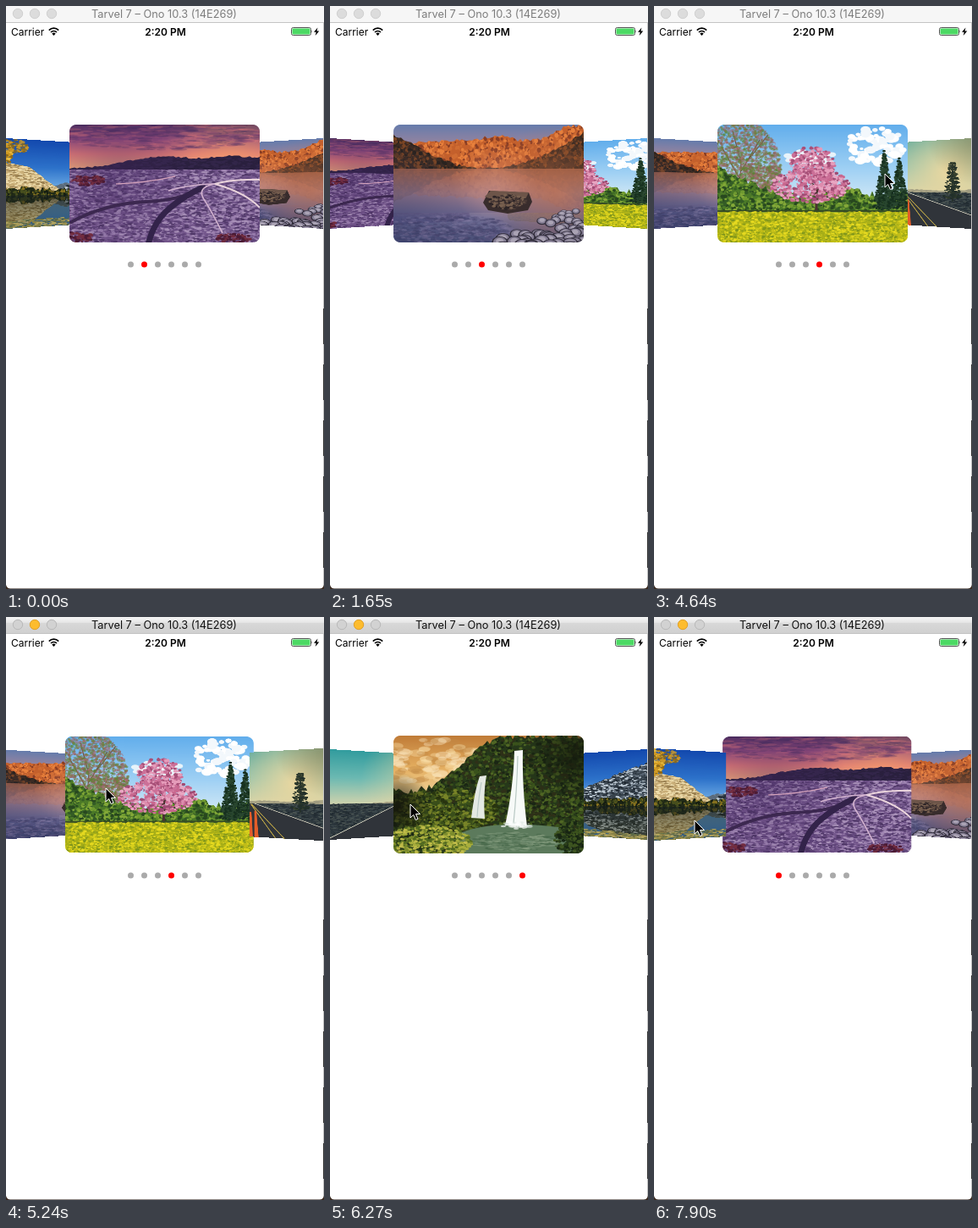
An HTML page with a canvas for the animation above (8 s loop, 376 px wide and 688 px high).

```html
<!DOCTYPE html>
<html lang="en">
<head>
<meta charset="utf-8">
<title>Carousel</title>
<style>
html, body { margin: 0; width: 100%; height: 100%; overflow: hidden; background: #fff; }
canvas, svg { position: absolute; left: 0; top: 0; }
text { font-family: Inter, Roboto, sans-serif; }
#bar { fill: #f6f6f6; }
#title { font-size: 12.8px; fill: #7d7d7d; }
.light { fill: #dcdcdc; stroke: #d0d0d0; }
.active #bar { fill: url(#metal); }
.active #title { fill: #111; }
.active .light { fill: #d2d2d2; stroke: #b9b9b9; }
.active #mid { fill: #fdbc2e; stroke: #e0a028; }
.dot { fill: #aaa; }
.dot.on { fill: #f00; }
</style>
</head>
<body>
<canvas id="stage" width="376" height="688"></canvas>
<svg id="ui" width="376" height="688">
  <defs>
    <linearGradient id="metal" x2="0" y2="1">
      <stop offset=".1" stop-color="#f2f2f2"/><stop offset=".34" stop-color="#e4e4e4"/>
      <stop offset=".36" stop-color="#d8d8d8"/><stop offset="1" stop-color="#cfcfcf"/>
    </linearGradient>
  </defs>
  <rect id="bar" width="376" height="20"/>
  <path d="M0 19.5H376" stroke="#c4c4c4"/>
  <circle class="light" cx="14" cy="9" r="5.7"/>
  <circle class="light" id="mid" cx="34" cy="9" r="5.7"/>
  <circle class="light" cx="54" cy="9" r="5.7"/>
  <text id="title" x="187" y="14" text-anchor="middle">Tarvel 7 – Ono 10.3 (14E269)</text>

  <text x="6" y="34.5" font-size="12">Carrier</text>
  <path d="M50.8 28.6a8 8 0 0 1 11.4 0M53 31a5 5 0 0 1 7 0" fill="none" stroke="#000" stroke-width="1.7"/>
  <path d="M56.5 35l-2.2-2.4a3.2 3.2 0 0 1 4.4 0z"/>
  <text x="188.5" y="34.5" font-size="12" font-weight="600" text-anchor="middle">2:20 PM</text>
  <rect x="337.5" y="25.5" width="23" height="9" rx="2" fill="none" stroke="#555"/>
  <rect x="338.5" y="26.5" width="21" height="7" rx="1" fill="#4cd964"/>
  <path d="M361.5 28.5q1.5 1.5 0 3z" fill="#555"/>
  <path d="M368.5 25.5l-4.5 5.3h2.7l-1 4.2 4.6-5.5h-2.8z"/>

  <path d="M375.5 20V688" stroke="#c4c4c4"/>
  <path d="M375.5 357V688" stroke="#333" stroke-dasharray="42 24"/>
  <path d="M0 687.5H376" stroke="#8d8682"/>
  <path d="M0 683v5h5q-4-1-5-5zM376 683v5h-5q4-1 5-5z" fill="#3a2a20"/>
  <g id="dots"></g>
  <path id="cursor" d="M0 0V16l3.7-3.5 2.6 6 2.8-1.2-2.6-5.8h5z" stroke="#fff"/>
</svg>
<script>
const W = 225, H = 139, COUNT = 6, LOOP = 8000;
const ui = document.getElementById('ui');
const dotBox = document.getElementById('dots');
const cursor = document.getElementById('cursor');
const stage = document.getElementById('stage').getContext('2d');

for (let i = 0; i < COUNT; i++)
  dotBox.innerHTML += `<circle class="dot" cx="${147.5 + 16 * i}" cy="305" r="3.5"/>`;

// ---- Landscape painting ----
let g, seed;
const rnd = () => (seed = (seed * 16807) % 2147483647) / 2147483647;

function ramp(y0, y1, ...colors) {
  const f = g.createLinearGradient(0, y0, 0, y1);
  colors.forEach((c, i) => f.addColorStop(i / (colors.length - 1), c));
  g.fillStyle = f;
  g.fillRect(0, y0, W, y1 - y0);
}
function glow(x, y, r, color) {
  const f = g.createRadialGradient(x, y, 0, x, y, r);
  f.addColorStop(0, color);
  f.addColorStop(1, color.slice(0, 7) + '00');
  g.fillStyle = f;
  g.fillRect(0, 0, W, H);
}
function shape(fill, d) {
  g.fillStyle = fill;
  g.fill(new Path2D(d));
}
function line(color, width, d) {
  g.strokeStyle = color;
  g.lineWidth = width;
  g.stroke(new Path2D(d));
}
// Fills an ellipse with random flecks.
function blob(cx, cy, rx, ry, size, flat, ...colors) {
  const n = 2 * rx * ry / (size * size * flat);
  for (let i = 0; i < n; i++) {
    const a = rnd() * 7, d = Math.sqrt(rnd()), s = size * (.4 + rnd());
    g.fillStyle = colors[Math.floor(rnd() * colors.length)];
    g.beginPath();
    g.ellipse(cx + rx * d * Math.cos(a), cy + ry * d * Math.sin(a), s, s * flat, 0, 0, 7);
    g.fill();
  }
}
// Fleck-textured ground under a rough skyline through evenly spaced heights.
function land(heights, base, rough, size, flat, ...colors) {
  const path = new Path2D(), last = heights.length - 1;
  path.moveTo(0, base);
  for (let x = 0; x <= W; x += 3) {
    const k = x / W * last, i = Math.min(Math.floor(k), last - 1);
    const y = heights[i] + (heights[i + 1] - heights[i]) * (k - i);
    path.lineTo(x, Math.min(base, y + (rnd() - .5) * rough));
  }
  path.lineTo(W, base);
  g.save();
  g.clip(path);
  g.fillStyle = colors[0];
  g.fillRect(0, 0, W, H);
  const top = Math.min(...heights) - rough;
  blob(W / 2, (top + base) / 2, W * .7, (base - top) * .7, size, flat, ...colors);
  g.restore();
}
// Paints a shore and its reflection below the waterline.
function mirror(y, paint) {
  const start = seed;
  for (const flip of [-1, 1]) {
    seed = start;
    g.save();
    g.translate(0, y - flip * y);
    g.scale(1, flip);
    g.beginPath();
    g.rect(0, 0, W, y);
    g.clip();
    paint();
    g.restore();
  }
}

const scenes = [
  function alpineLake() {
    mirror(88, () => {
      ramp(0, 88, '#1349ae', '#2d72ca', '#80bcec');
      land([88, 88, 70, 66, 66, 88], 88, 3, 2, .6, '#5b6c7c', '#788796');
      land([88, 88, 88, 88, 72, 58, 46, 34, 24, 12], 88, 4, 2, .5, '#38434d', '#566370', '#bcc8d2', '#222b34');
      land([46, 38, 44, 68, 88, 88, 88, 88, 88, 88], 88, 2, 2.2, .4, '#c9ae78', '#ead9ab', '#9a8051', '#eddbaa');
      land([74, 78, 80, 76, 73], 88, 7, 1.5, 1.4, '#222b17', '#474f1e', '#85701f', '#161e12');
    });
    ramp(88, 139, '#141e2099', '#3c3a1055');
    blob(90, 136, 120, 10, 3, .25, '#8c8445', '#b5a660', '#596849');
    blob(10, 20, 18, 25, 2, .8, '#d29b22', '#8c6819', '#e8bd43');
    blob(32, 12, 16, 10, 2, .8, '#cf9a28cc', '#8a6a20cc');
  },
  function badlands() {
    ramp(0, 52, '#4a2c5e', '#8f4a7a', '#da7676', '#f0a87a');
    glow(190, 42, 85, '#ffac6888');
    blob(110, 12, 120, 18, 7, .15, '#6e3e7044', '#d4727844', '#3c2b5c44');
    land([52, 49, 42, 37, 40, 37, 39], 54, 2, 3, .3, '#2a203e', '#33264a');
    land([53, 53], 139, 0, 2.5, .35, '#74578c', '#9a7fae', '#60457a', '#a890b8', '#503868');
    glow(60, 60, 90, '#44286066');
    line('#3c2850', 4, 'M0 116Q42 93 90 91T160 71');
    line('#33234a', 7, 'M93 142Q99 115 118 99T158 74');
    line('#ead4dc', 2, 'M225 98Q208 80 172 70 194 64 225 65');
    line('#d4b4d0', 1.6, 'M172 70Q150 74 159 88T181 128M172 70Q145 70 117 78');
    line('#d6a4bc', 1.2, 'M55 70Q90 69 125 61');
    for (const [x, y] of [[22, 66], [8, 133], [194, 134]]) blob(x, y, 20, 6, 2, .6, '#4b1b35', '#722d40');
  },
  function rockyLake() {
    mirror(52, () => {
      ramp(0, 30, '#667cac', '#a5879c');
      land([22, 21, 20, 19, 17, 12, 19, 18, 4, 0], 52, 4, 1.8, 1.2, '#c4602c', '#e8803c', '#8a3e24', '#d06c32');
      land([12, 24, 38, 48, 52, 52, 46, 38, 26, 10], 52, 4, 1.8, 1, '#3c2a20', '#5f3820', '#2a221c', '#7c4522');
    });
    ramp(52, 139, '#a8644acc', '#a07a86dd', '#62608ce6', '#3c426cf0');
    glow(190, 80, 80, '#c0704c99');
    glow(120, 70, 50, '#e0a09066');
    glow(0, 125, 110, '#373c6888');
    blob(65, 124, 75, 18, 3, .35, '#55507a55', '#8078a055', '#393a6055');
    for (let i = 0; i < 110; i++) {
      const x = 112 + rnd() * 116, y = 97 + i * .42, s = 3.5 + i * .04;
      if (y < 141 - (x - 105) * .42) continue;
      for (const [k, color] of [[1, '#302c3a'], [.82, '#857e94'], [.5, '#aaa3b4']]) {
        g.fillStyle = color;
        g.beginPath();
        g.ellipse(x, y + k * 2, s * k * 1.3, s * k * .9, 0, 0, 7);
        g.fill();
      }
    }
    shape('#382c2c', 'M106 92L113 78 160 80 164 91 159 101 135 105 112 101z');
    shape('#6d5549', 'M108 85L115 78 160 80 154 92 119 89z');
    blob(135, 91, 22, 9, 1.8, .6, '#4a3a36', '#78604f', '#2c2426');
  },
  function blossom() {
    ramp(0, 102, '#62aeec', '#9ed0f4', '#e2f0f6');
    blob(185, 25, 36, 22, 5, .7, '#fff', '#f3f8fc');
    blob(110, 40, 30, 9, 4, .6, '#fff', '#e7f3fa');
    line('#6a5744', 1.3, 'M24 102L28 45 18 8M28 55L50 18M27 65L6 28M36 42L60 12');
    blob(27, 50, 48, 55, 1.5, .8, '#78803a88', '#8c655c99', '#5d833699', '#a86a7088');
    land([52, 62, 74, 80, 84, 78, 72, 82, 84, 80], 104, 8, 2, .8, '#4c7a28', '#6f9a30', '#345c26', '#83a838', '#28481f');
    for (const [x, top] of [[197, 34], [215, 42]])
      for (let y = top; y < 98; y += 3) blob(x, y, 1 + (y - top) * .2, 3, 1.5, .7, '#17301f', '#29462f');
    line('#4a3230', 3, 'M117 103V76L105 62M117 80L132 60');
    blob(110, 72, 46, 20, 2, .75, '#c8688f', '#dd8cae', '#a04c74', '#e9a6c2');
    blob(112, 47, 27, 21, 2, .75, '#cc7098', '#e59cba', '#a85078');
    line('#374c25', 2, 'M0 102H225');
    land([103, 103], 139, 2, 1.6, .6, '#a6ae18', '#d8d01c', '#81961c', '#e6da20', '#c0bc18');
  },
  function loneRoad() {
    ramp(0, 86, '#329c9e', '#6bb9b2', '#d3d4ad');
    glow(178, 50, 120, '#ecd8a0');
    glow(225, 0, 75, '#807448aa');
    land([86, 86, 82, 79, 82, 76], 88, 1, 4, .3, '#a09c80', '#aca688');
    land([84, 84], 139, 1, 2, .3, '#2c363c', '#3c484c', '#202a30', '#4a5452');
    shape('#30343a', 'M110 84L122 84 225 124V139H15z');
    line('#c6c5b4', 1.2, 'M110 85L15 139M121 84L225 126');
    line('#bda647', 1.2, 'M116 85L150 139M117 85L162 139');
    shape('#e35d29', 'M114 98h3l2 41h-7zM121 96h3l3 43h-6z');
    line('#25302a', 2, 'M182 98V38');
    for (let y = 40; y < 90; y += 7) blob(182, y, 3 + (y - 30) * .14, 4, 1.6, .6, '#22302a', '#36402f');
  },
  function waterfall() {
    ramp(0, 75, '#c07c38', '#e4ae60', '#f3d9a1');
    blob(45, 30, 65, 26, 7, .45, '#f7dda666', '#c08a4866', '#fae9c566');
    land([64, 66, 58, 38, 16, 2, 0, 0, 0, 0], 139, 8, 2, .8, '#26381a', '#3a521c', '#1a2614', '#4f6624', '#2e3018');
    blob(60, 88, 65, 25, 2, .7, '#56691f', '#3a4e1a', '#788428', '#28340f');
    glow(5, 85, 42, '#14160cee');
    glow(215, 20, 60, '#141a0ccc');
    shape('#5c7a5c', 'M72 118Q112 98 195 108L215 139H82z');
    blob(142, 125, 50, 11, 4, .2, '#7d967a77', '#466648aa', '#93a88a66');
    shape('#e4e9e3', 'M102 48L110 47Q106 70 108 98L92 97Q96 65 102 48z');
    shape('#f7faf8', 'M143 18L153 17Q152 60 158 107L132 106Q142 60 143 18z');
    line('#b9c9c4', 1.2, 'M147 24Q146 65 142 103M104 55Q100 78 99 96');
    blob(145, 106, 18, 4, 3, .4, '#fff9', '#dbe5df99');
    blob(40, 126, 52, 20, 2, .6, '#7c8c2c', '#a8ae3c', '#526a20', '#c0bc4a');
    blob(212, 121, 22, 22, 2, .8, '#253819', '#3e5520', '#182613');
  }
];

const cards = scenes.map((paint, i) => {
  const c = document.createElement('canvas');
  c.width = 2 * W;
  c.height = 2 * H;
  g = c.getContext('2d');
  seed = 4321 + 77 * i;
  g.scale(2, 2);
  g.beginPath();
  g.roundRect(0, 0, W, H, 8);
  g.clip();
  paint();
  return c;
});

// ---- Carousel ----
// Edges and half heights of a card d places from the middle.
function quad(d) {
  const a = Math.abs(d), c = Math.min(a, 1), far = W * (a - c);
  const q = { x0: 75 + 135 * c + far, x1: 300 + 95 * c + far, h0: 69.5 - 26 * c, h1: 69.5 - 14.8 * c };
  return d < 0 ? { x0: 375 - q.x1, x1: 375 - q.x0, h0: q.h1, h1: q.h0 } : q;
}

// Draws a card in perspective, one column at a time.
function drawCard(index, pos) {
  const { x0, x1, h0, h1 } = quad(index - pos);
  const img = cards[(index + COUNT) % COUNT];
  const at = x => {
    const t = (x - x0) / (x1 - x0), h = h0 + (h1 - h0) * t;
    return { u: t * h1 / h, h };
  };
  for (let x = Math.max(0, Math.floor(x0)); x < Math.min(375, x1); x++) {
    const l = Math.max(x, x0), r = Math.min(x + 1, x1);
    const a = at(l), b = at(r), h = (a.h + b.h) / 2;
    stage.drawImage(img, a.u * 2 * W, 0, (b.u - a.u) * 2 * W, 2 * H, l, 209.5 - h, r - l, 2 * h);
  }
}

function drawCarousel(pos) {
  stage.clearRect(0, 0, 376, 688);
  const mid = Math.round(pos);
  for (const k of [-2, 2, -1, 1, 0]) drawCard(mid + k, pos);
  // Neighbours pass in front of the middle card beyond the edges of its slot.
  for (const k of [-1, 1]) {
    const edge = 187.5 + W * (mid + k / 2 - pos);
    stage.save();
    stage.beginPath();
    stage.rect(k < 0 ? edge - W : edge, 0, W, 688);
    stage.clip();
    drawCard(mid + k, pos);
    stage.restore();
  }
}

// ---- Timeline ----
// Each swipe: start time and how far the finger has pulled when first seen.
const swipes = [[1350, .13], [4340, .165], [5240, .053], [5970, .1], [6710, .15], [7750, .15]];
const TICK = 145;

// After the pull, the card snaps home exponentially, sampled once per tick.
function progress(t, [start, pull]) {
  const k = Math.floor((t - start) / TICK);
  return k < 0 ? 0 : k > 1 ? 1 : 1 - (1 - pull) * .053 ** k;
}

// Pointer stops: time, x, y.
const stops = [
  [4640, 273, 198], [4790, 255, 183], [5240, 118, 202], [5530, 169, 201],
  [5670, 232, 209], [6120, 95, 221], [6410, 177, 217], [6860, 5, 235],
  [7160, 68, 228], [7310, 126, 232], [7600, 76, 237], [7750, 48, 240]
];
let shownPos;

function frame() {
  const t = performance.now() % LOOP;
  const pos = swipes.reduce((sum, s) => sum + progress(t, s), 1);
  if (pos !== shownPos) {
    drawCarousel(shownPos = pos);
    [...dotBox.children].forEach((dot, i) => dot.classList.toggle('on', i === Math.floor(pos) % COUNT));
  }
  ui.classList.toggle('active', t >= 5240);
  const stop = stops.findLast(s => s[0] <= t);
  cursor.style.display = stop ? '' : 'none';
  if (stop) cursor.setAttribute('transform', `translate(${stop[1]} ${stop[2]})`);
  requestAnimationFrame(frame);
}
frame();
</script>
</body>
</html>
```
